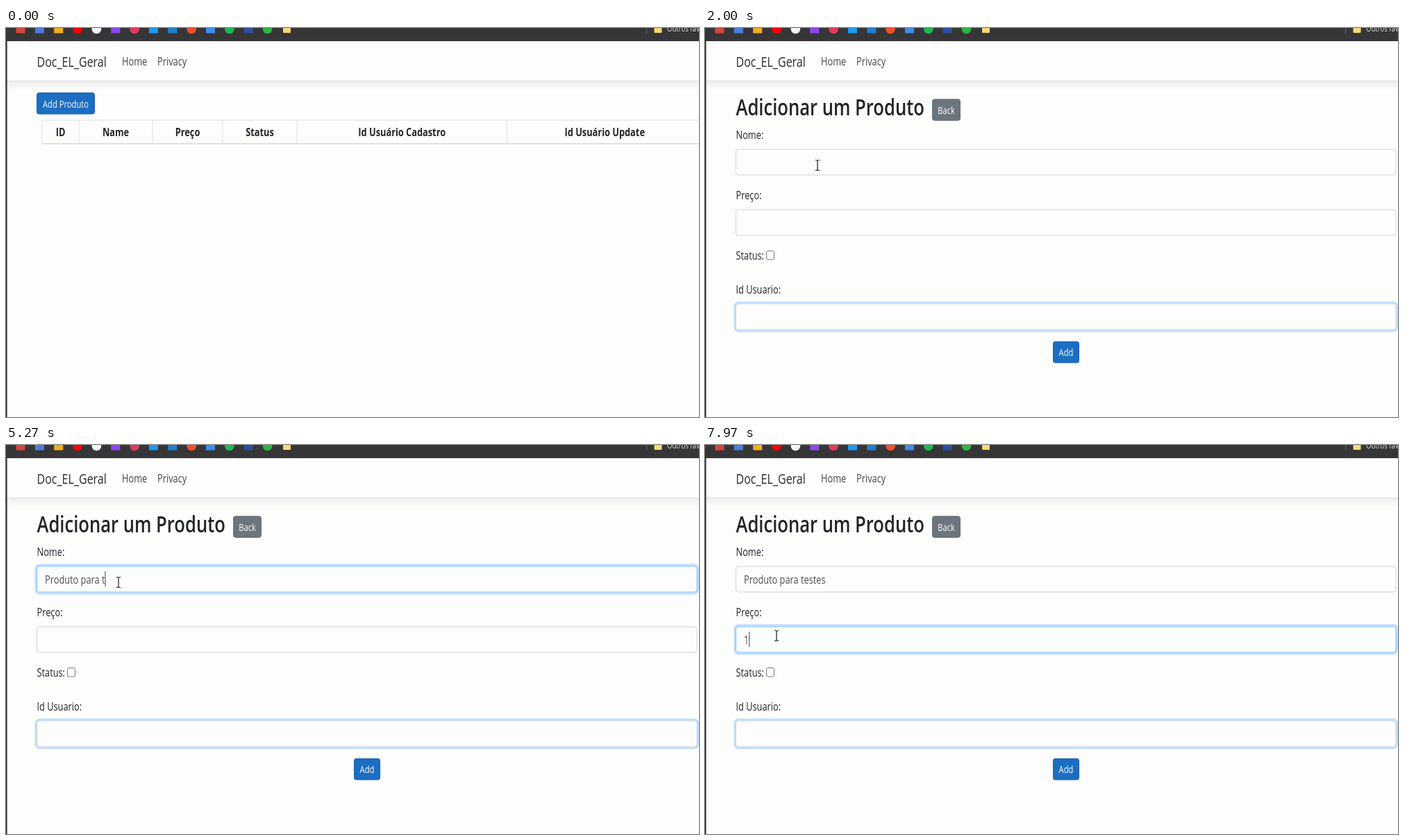
An HTML page for the animation above (8 s loop, 998 by 561 pixels).

```html
<!DOCTYPE html>
<html lang="pt">
<head>
<meta charset="utf-8">
<title>Adicionar um Produto</title>
<style>
  html, body { margin: 0; width: 100%; height: 100%; overflow: hidden; background: #fdfdfc; }
  svg { display: block; width: 998px; height: 561px; }
  text { font-family: "Open Sans", "Noto Sans", sans-serif; white-space: pre; }
</style>
</head>
<body>
<svg id="stage" viewBox="0 0 998 561">
  <defs>
    <linearGradient id="shade" x2="0" y2="1">
      <stop offset="0" stop-color="#000" stop-opacity=".06"/>
      <stop offset="1" stop-color="#000" stop-opacity="0"/>
    </linearGradient>
  </defs>
  <rect width="998" height="561" fill="#fdfdfc"/>
  <g id="chrome"></g>
  <g id="list"></g>
  <g id="form"></g>
  <rect id="caret" width="1" height="22" fill="#3c4248"/>
  <g id="pointer" stroke-linejoin="round" stroke-linecap="round"></g>
</svg>
<script>
const LOOP = 8000;
const SQUEEZE = 0.8; // the whole page is shown narrower than its layout
const OPEN = 1160, FOCUS_NAME = 2150, FOCUS_PRICE = 7100;
const TYPE_START = 3600, KEY_GAP = 118, PRICE_KEY = 7850, BLINK = 530;
const NAME = "Produto para testes";
const LAST_KEY = TYPE_START + KEY_GAP * NAME.length;

const $ = id => document.getElementById(id);
const chrome = $("chrome"), list = $("list"), form = $("form"), caret = $("caret");

function add(parent, tag, attrs) {
  const el = document.createElementNS("http://www.w3.org/2000/svg", tag);
  for (const k in attrs) el.setAttribute(k, attrs[k]);
  return parent.appendChild(el);
}

function rect(parent, x, y, width, height, fill, more) {
  return add(parent, "rect", { x, y, width, height, fill, ...more });
}

function label(parent, str, x, y, size = 16, fill = "#212529", more) {
  const el = add(parent, "text", {
    transform: `translate(${x} ${y}) scale(${SQUEEZE} 1)`, "font-size": size, fill, ...more
  });
  el.textContent = str;
  return el;
}

function button(parent, str, x, y, width, fill, stroke) {
  const box = rect(parent, x, y, width, 30.5, fill, { rx: 3, stroke });
  label(parent, str, x + width / 2, y + 21, 14, "#fff", { "text-anchor": "middle" });
  return box;
}

function field(y) {
  const glow = rect(form, 43, y - 2, 953.5, 41, "none", { rx: 5, stroke: "#bfdeff", "stroke-width": 3 });
  const box = rect(form, 44.5, y, 950.5, 37, "#fdfdfd", { rx: 3.5, stroke: "#ced4da" });
  const text = label(form, "", 56, y + 25, 16, "#495057");
  return { y, glow, box, text };
}

// Browser bar and site header
rect(chrome, 0, 76, 998, 14, "url(#shade)");
rect(chrome, 0, 19, 998, 57, "#fdfdfd");
rect(chrome, 0, 76, 998, 1, "#d9dce0");
rect(chrome, 0, 0, 998, 19, "#363638");
rect(chrome, 0, 19, 1.6, 542, "#2c2c2e");
const marks = ["#d8463b", "#4a7fe0", "#f2b01e", "#f00", "#f4f4f4", "#8f45f0", "#e2395f",
  "#1d9bf0", "#1f7fd0", "#f4502a", "#3f8cf0", "#1eb954", "#2c4fa0", "#2cb742"];
marks.forEach((c, i) => {
  const x = 21 + i * 27.35;
  if ([3, 4, 6, 9, 11, 13].includes(i)) add(chrome, "circle", { cx: x, cy: 1.5, r: 6.8, fill: c });
  else rect(chrome, x - 6.5, -5, 13, 12.5, c);
});
for (const x of [399, 933.5]) rect(chrome, x, -4, 11, 11, "#f6d878", { rx: 1 });
rect(chrome, 922, 0, 1, 8, "#66666a");
label(chrome, "Outros favoritos", 952, 4.5, 12, "#dedee0");
label(chrome, "Doc_EL_Geral", 44.5, 55.5, 20, "#2b2b2d");
label(chrome, "Home", 167, 54, 16, "#454547");
label(chrome, "Privacy", 218, 54, 16, "#454547");

// Product list
const addButton = button(list, "Add Produto", 44.5, 93.5, 83, "#1b6ec2", "#1861ac");
const edges = [52, 105, 211, 312, 419, 721.5, 1003];
["ID", "Name", "Preço", "Status", "Id Usuário Cadastro", "Id Usuário Update"].forEach((s, i) => {
  rect(list, edges[i] - .5, 133, 1, 34, "#dee2e6");
  label(list, s, (edges[i] + edges[i + 1]) / 2, 156, 16, "#212529",
    { "text-anchor": "middle", "font-weight": 700 });
});
rect(list, 51.5, 132.5, 947, 1, "#dee2e6");
rect(list, 51.5, 166, 947, 1.6, "#d9dce4");

// Product form
label(form, "Adicionar um Produto", 44.5, 126, 32, "#212529", { "font-weight": 600 });
button(form, "Back", 327.5, 102.8, 40, "#6c757d", "#687179");
label(form, "Nome:", 44.5, 160);
label(form, "Preço:", 44.5, 247);
label(form, "Status:", 44.5, 334);
label(form, "Id Usuario:", 44.5, 383);
rect(form, 88.5, 321.5, 11, 12.5, "#fff", { rx: 2, stroke: "#767676" });
const nameField = field(175), priceField = field(262);
field(398);
button(form, "Add", 501.5, 452.3, 37, "#1b6ec2", "#1861ac");

// Pointer shapes, hotspot at 0,0
const shapes = {};
function shape(id, d, fill, stroke, width) {
  shapes[id] = shapes[id] || add($("pointer"), "g", {});
  add(shapes[id], "path", { d, fill, stroke, "stroke-width": width });
}
shape("arrow", "M0 0V16.5L3.4 13.2L5.6 18.2L7.8 17.2L5.7 12.3H10Z", "#fff", "#222", 1);
const beam = "M-2.6 -7.5Q-.4 -7.5 0 -6.2Q.4 -7.5 2.6 -7.5M0 -6.2V6.2M-2.6 7.5Q-.4 7.5 0 6.2Q.4 7.5 2.6 7.5";
shape("beam", beam, "none", "#fff", 2.6);
shape("beam", beam, "none", "#1c1c1c", 1.2);
shape("hand", "M-1.5 1Q0 -1 1.5 1V7.5Q3 6.6 4 8Q5.6 7.2 6.4 8.7Q8.6 8.2 8.6 10.5V15.5Q8.6 18 7 19.5V22.5H-.8V20L-4.2 14.5Q-5.4 12 -4 11.4Q-2.8 11 -1.5 13Z",
  "#fff", "#222", 1);
shape("hand", "M1.5 8V12M4 8.5V12M6.4 9V12", "none", "#222", .7);

// time, x, y
const path = [
  [150, 330, 570], [480, 190, 250], [720, 108, 102], [1130, 108, 102],
  [1400, 141, 132], [1560, 148, 145], [1950, 162, 198], [6080, 162, 198],
  [6470, 119, 238], [6800, 103, 275]
];

function pointerAt(t) {
  const n = path.findIndex(p => p[0] > t);
  if (n < 0) return path[path.length - 1].slice(1);
  if (n === 0) return path[0].slice(1);
  const a = path[n - 1], b = path[n];
  const u = (t - a[0]) / (b[0] - a[0]), e = u * u * (3 - 2 * u);
  return [a[1] + (b[1] - a[1]) * e, a[2] + (b[2] - a[2]) * e];
}

function pointerKind(onForm, x, y) {
  const within = (top, bottom) => y > top && y < bottom;
  if (!onForm) return x > 44 && x < 128 && within(93, 125) ? "hand" : "arrow";
  return within(95, 141) || within(175, 212) || within(262, 299) ? "beam" : "arrow";
}

function setFocus(f, amount) {
  f.glow.setAttribute("opacity", amount);
  f.box.setAttribute("stroke", amount > .5 ? "#80bdff" : "#ced4da");
}

const clamp = v => Math.max(0, Math.min(1, v));

function draw(t) {
  const onForm = t >= OPEN;
  list.style.display = onForm ? "none" : "";
  form.style.display = onForm ? "" : "none";

  const [x, y] = pointerAt(t), kind = pointerKind(onForm, x, y);
  $("pointer").setAttribute("transform", `translate(${x} ${y})`);
  for (const id in shapes) shapes[id].style.display = id === kind ? "" : "none";
  addButton.setAttribute("fill", kind === "hand" ? "#136bc6" : "#1b6ec2");

  const typed = Math.max(0, Math.floor((t - TYPE_START) / KEY_GAP));
  nameField.text.textContent = NAME.slice(0, typed);
  priceField.text.textContent = t >= PRICE_KEY ? "1" : "";

  const toPrice = clamp((t - FOCUS_PRICE) / 150);
  setFocus(nameField, clamp((t - FOCUS_NAME) / 150) * (1 - toPrice));
  setFocus(priceField, toPrice);

  const active = t >= FOCUS_PRICE ? priceField : nameField;
  const typing = t >= TYPE_START + KEY_GAP && t < LAST_KEY;
  const since = [PRICE_KEY, FOCUS_PRICE, LAST_KEY, FOCUS_NAME].find(s => t >= s);
  const lit = since !== undefined && (typing || Math.floor((t - since) / BLINK) % 2 === 0);
  caret.style.display = lit ? "" : "none";
  const str = active.text.textContent;
  const end = str && onForm ? active.text.getComputedTextLength() * SQUEEZE : 0;
  caret.setAttribute("x", 56 + end);
  caret.setAttribute("y", active.y + 7);
}

function tick() {
  draw(performance.now() % LOOP);
  requestAnimationFrame(tick);
}
tick();
</script>
</body>
</html>
```
